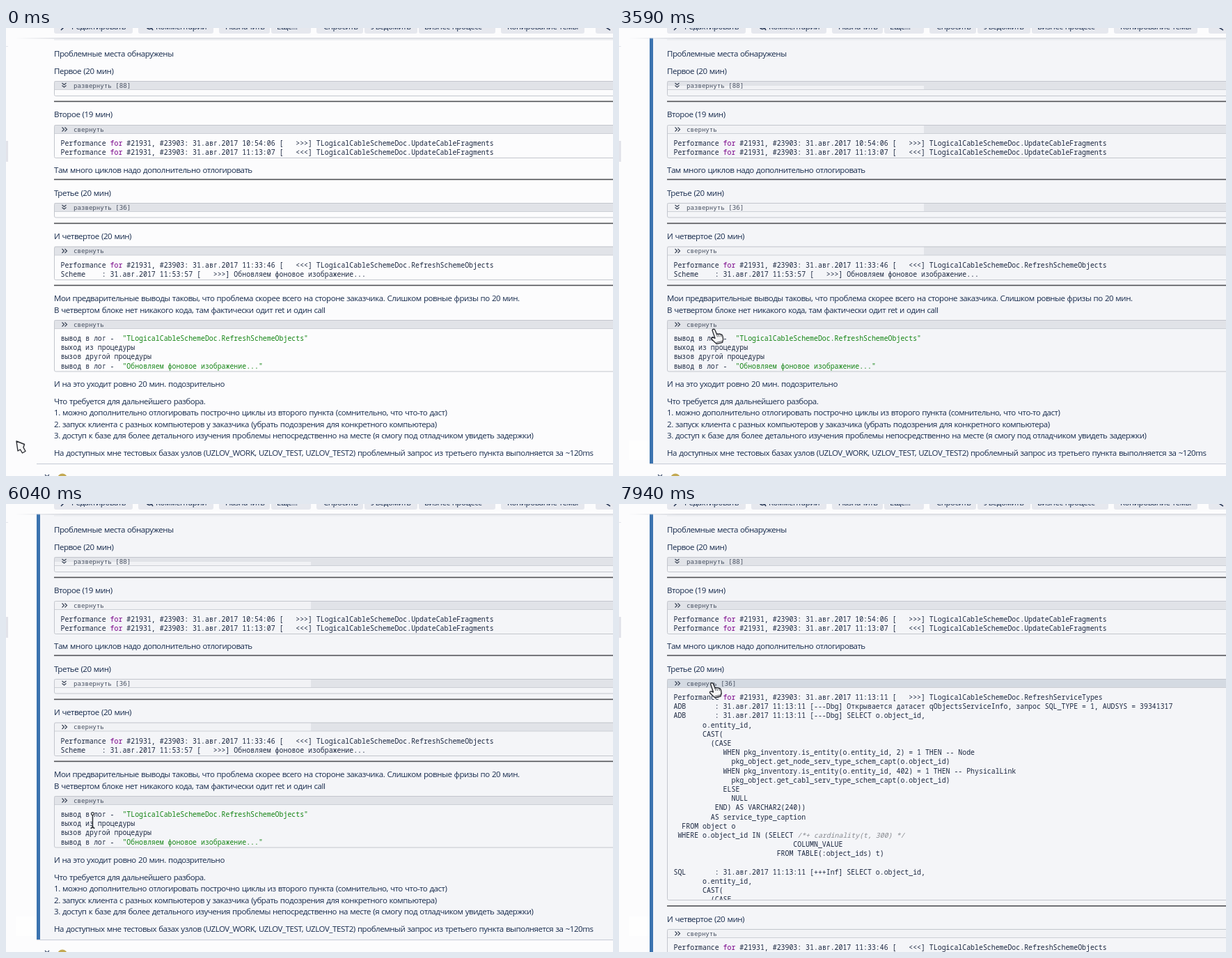
These frames come from a looping animation (872 px wide and 643 px high, 8000 ms). An HTML page:

```html
<!DOCTYPE html>
<html lang="ru">
<head>
<meta charset="utf-8">
<title>Комментарий</title>
<style>
html, body { margin: 0; width: 100%; height: 100%; overflow: hidden; background: #fcfcfd; }
svg { display: block; }
text { white-space: pre; fill: #172b4d; }
.body { font: 11.5px "Open Sans", "Noto Sans", sans-serif; letter-spacing: -.45px; word-spacing: .65px; }
.code { font: 9.89px "Noto Sans Mono", "DejaVu Sans Mono", monospace; fill: #1b2740; }
.label { font: 9.1px "DejaVu Sans Mono", "Liberation Mono", monospace; fill: #4a5364; }
.str { fill: #138413; }
.key { fill: #770088; }
.note { fill: #85888e; font-style: italic; }
</style>
</head>
<body>
<svg id="stage" width="872" height="643" viewBox="0 0 872 643"></svg>
<script>
const LOOP = 8000, PITCH = 13.2, HEAD = 12.5;
const stage = document.getElementById('stage');

function add(parent, tag, attrs = {}, text) {
  const node = document.createElementNS('http://www.w3.org/2000/svg', tag);
  set(node, attrs);
  if (text) node.textContent = text;
  parent.appendChild(node);
  return node;
}
function set(node, attrs) {
  for (const key in attrs) node.setAttribute(key, attrs[key]);
}
const rect = (p, x, y, width, height, fill, more) =>
  add(p, 'rect', { x, y, width, height, fill, ...more });
const para = (p, y, text, x = 69) => add(p, 'text', { x, y, class: 'body' }, text);
const rule = (p, y) => rect(p, 69, y - .4, 803, 1.6, '#505256');
const shift = (node, y) => set(node, { transform: `translate(0 ${y})` });
const show = (node, on) => set(node, { visibility: on ? 'visible' : 'hidden' });

// One line of code; strings, keywords and hints get their colours
function codeLine(p, y, line) {
  const row = add(p, 'text', { x: 78.5, y, class: 'code' });
  for (const part of line.split(/(".*?"|\bfor\b|\/\*.*?\*\/)/)) {
    if (!part) continue;
    const kind = part[0] === '"' ? 'str' : part === 'for' ? 'key' : part.startsWith('/*') ? 'note' : '';
    add(row, 'tspan', kind ? { class: kind } : {}, part);
  }
}

const OPEN_MARK = 'M-3-3l3 3-3 3M1-3l3 3-3 3';
const SHUT_MARK = 'M-3-3.500l3 2.500 3-2.500M-3 0l3 2.500 3-2.500';

// A foldable code block: small = folded height, grow = height added when open
function block(p, y, { small, grow = 0, count = '', code = '', patch = 0 }) {
  const head = rect(p, 69.5, y, 820, HEAD, '#e1e3e8');
  const ghost = rect(p, 70, y + HEAD - patch, 368, patch, '#f1f2f5');
  const frame = rect(p, 69.5, y + .5, 820, 0, 'none', { stroke: '#c3c6cd', rx: 2 });
  add(p, 'path', { d: `M70 ${y + HEAD}H872`, stroke: '#cdd0d6' });
  const mark = add(p, 'path', { transform: `translate(83.500 ${y + 6.5})`, fill: 'none', stroke: '#3c4658', 'stroke-width': 1.2 });
  const label = add(p, 'text', { x: 97, y: y + 9.6, class: 'label' });
  const view = add(p, 'svg', { x: 0, y: y + HEAD, width: 890, overflow: 'hidden' });
  if (code) code.split('\n').forEach((line, i) => codeLine(view, 17.5 + i * PITCH, line));
  return {
    pale(on, width) {
      show(ghost, on);
      set(ghost, { width });
    },
    update(open, shown, fill = '#e1e3e8', ink = '#4a5364') {
      const h = small + grow * open;
      set(head, { fill });
      set(frame, { height: HEAD + h });
      set(view, { height: h });
      set(mark, { d: shown ? OPEN_MARK : SHUT_MARK });
      label.textContent = (shown ? 'свернуть' : 'развернуть') + count;
      label.style.fill = ink;
    }
  };
}

// Page
rect(stage, 0, 0, 872, 643, '#fcfcfd');
const card = add(stage, 'g');
const cardFill = rect(card, 49, 14.5, 823, 611, '#f4f5f8');
const cardBar = rect(card, 44, 14.5, 5, 611, '#3b73af');
rect(card, 14, 592, 30, 28, '#fefefe');

rect(stage, 0, 26, 3, 1, '#e2e3ea');
rect(stage, 0, 162, 3, 30, '#e2e3ea');
const fade = add(add(stage, 'defs'), 'linearGradient', { id: 'fade' });
add(fade, 'stop', { offset: 0, 'stop-color': '#d4d6dc', 'stop-opacity': 0 });
add(fade, 'stop', { offset: .08, 'stop-color': '#d4d6dc' });
rect(stage, 14, 14, 858, 1.5, 'url(#fade)');
rect(stage, 69, 15.5, 803, 2, '#e9ebef');

[[69, 113, 94, 'Редактировать'], [190, 108, 215, 'Комментарии'], [306, 73, 315, 'Назначить'],
 [381, 57, 389, 'Ещё...'], [446, 67, 456, 'Спросить'], [515, 76, 524, 'Уведомить'],
 [593, 110, 601, 'Бизнес-процесс'], [711, 120, 720, 'Копирование темы'], [847, 40, 0, '']
].forEach(([x, w, tx, text]) => {
  rect(stage, x, -12, w, 20, '#e6e8ee', { rx: 3 });
  if (text) para(stage, 1.5, text, tx);
});
add(stage, 'path', { d: 'M79 3l4-4M202-2a4 4 0 0 0 7 2l2 3M860-2l8 5', stroke: '#2a3a58', 'stroke-width': 1.6, fill: 'none' });

// Comment text
const top1 = add(stage, 'g'), mid = add(stage, 'g'), tail = add(stage, 'g');

para(top1, 40.5, 'Проблемные места обнаружены');
para(top1, 65.5, 'Первое (20 мин)');
const first = block(top1, 76, { small: 8.5, count: ' [88]', patch: 5.5 });
rule(top1, 105);
para(top1, 128, 'Второе (19 мин)');
const second = block(top1, 139, { small: 34.5, patch: HEAD, code:
`Performance for #21931, #23903: 31.авг.2017 10:54:06 [   >>>] TLogicalCableSchemeDoc.UpdateCableFragments
Performance for #21931, #23903: 31.авг.2017 11:13:07 [   <<<] TLogicalCableSchemeDoc.UpdateCableFragments` });
para(top1, 208, 'Там много циклов надо дополнительно отлогировать');
rule(top1, 217);
para(top1, 240.5, 'Третье (20 мин)');
const third = block(top1, 251, { small: 8, grow: 296.5, count: ' [36]', patch: HEAD, code:
`Performance for #21931, #23903: 31.авг.2017 11:13:11 [   >>>] TLogicalCableSchemeDoc.RefreshServiceTypes
ADB       : 31.авг.2017 11:13:11 [---Dbg] Открывается датасет qObjectsServiceInfo, запрос SQL_TYPE = 1, AUDSYS = 39341317
ADB       : 31.авг.2017 11:13:11 [---Dbg] SELECT o.object_id,
       o.entity_id,
       CAST(
         (CASE
            WHEN pkg_inventory.is_entity(o.entity_id, 2) = 1 THEN -- Node
              pkg_object.get_node_serv_type_schem_capt(o.object_id)
            WHEN pkg_inventory.is_entity(o.entity_id, 402) = 1 THEN -- PhysicalLink
              pkg_object.get_cabl_serv_type_schem_capt(o.object_id)
            ELSE
              NULL
          END) AS VARCHAR2(240))
         AS service_type_caption
  FROM object o
 WHERE o.object_id IN (SELECT /*+ cardinality(t, 300) */
                             COLUMN_VALUE
                         FROM TABLE(:object_ids) t)

SQL       : 31.авг.2017 11:13:11 [+++Inf] SELECT o.object_id,
       o.entity_id,
       CAST(
         (CASE` });

rule(mid, 280);
para(mid, 303, 'И четвертое (20 мин)');
const fourth = block(mid, 313.5, { small: 35, patch: HEAD, code:
`Performance for #21931, #23903: 31.авг.2017 11:33:46 [   <<<] TLogicalCableSchemeDoc.RefreshSchemeObjects
Scheme    : 31.авг.2017 11:53:57 [   >>>] Обновляем фоновое изображение...` });
rule(mid, 369);
para(mid, 392, 'Мои предварительные выводы таковы, что проблема скорее всего на стороне заказчика. Слишком ровные фризы по 20 мин.');
para(mid, 408.5, 'В четвертом блоке нет никакого кода, там фактически одит ret и один call');
const fifth = block(mid, 419, { small: 8.5, grow: 52.5, code:
`вывод в лог -  "TLogicalCableSchemeDoc.RefreshSchemeObjects"
выход из процедуры
вызов другой процедуры
вывод в лог -  "Обновляем фоновое изображение..."` });

para(tail, 514.5, 'И на это уходит ровно 20 мин. подозрительно');
para(tail, 539.5, 'Что требуется для дальнейшего разбора.');
para(tail, 556, '1. можно дополнительно отлогировать построчно циклы из второго пункта (сомнительно, что что-то даст)');
para(tail, 572.5, '2. запуск клиента с разных компьютеров у заказчика (убрать подозрения для конкретного компьютера)');
para(tail, 589, '3. доступ к базе для более детального изучения проблемы непосредственно на месте (я смогу под отладчиком увидеть задержки)');
para(tail, 613.5, 'На доступных мне тестовых базах узлов (UZLOV_WORK, UZLOV_TEST, UZLOV_TEST2) проблемный запрос из третьего пункта выполняется за ~120ms');
rect(tail, 44, 625, 828, 1.2, '#cbd0d9');
add(tail, 'path', { d: 'M56 641l3 3 3-3', fill: 'none', stroke: '#42526e', 'stroke-width': 1.4 });
add(tail, 'circle', { cx: 81, cy: 646.5, r: 7, fill: '#c3a952' });
const author = para(tail, 652.5, '', 94);
add(author, 'tspan', { style: 'fill:#3a1d6e' }, 'Фадей Мужилов');
add(author, 'tspan', {}, ' добавил(а) комментарий - 31.08.2017 13:45');
rect(tail, 85, 672, 1, 60, '#dfe1e6');
para(tail, 692.5, 'Рефреш, отрисовка компонентов морды.', 102);

// Pointers
const pointer = add(stage, 'g');
const ink = { fill: '#f6f6f6', stroke: '#2b2d33', 'stroke-width': 1.4, 'stroke-linejoin': 'round' };
const shapes = {
  arrow: add(pointer, 'path', { d: 'M1 1L12.500 5.500 11 10 14 15.500 9.500 18 6.500 13 3 15Z', ...ink }),
  beam: add(pointer, 'g'),
  hand: add(pointer, 'g')
};
add(shapes.beam, 'path', { d: 'M0-6V11M-3 12.500Q0 12 0 9Q0 12 3 12.500', fill: 'none', stroke: '#2f3238', 'stroke-width': 1.5 });
add(shapes.beam, 'circle', { cy: -8.5, r: 2, fill: '#fff', stroke: '#2f3238', 'stroke-width': 1.2 });
add(shapes.hand, 'path', { d: 'M-3.500 1.500Q-3-.5-.5 0Q.5 .5 3 7.500Q4 6 5.500 7Q7 6 8.500 7.500Q10.500 7 11.500 10Q13 14.500 11 19L3 21Q-1 18-4.500 14Q-5 11.500-2 12L.5 13Z', ...ink });
add(shapes.hand, 'path', { d: 'M3 7.500l1 3.500M5.500 7.500l1 3.500M8.500 8l1 3M2.500 19L11 17', stroke: '#55585f', fill: 'none' });

// Pointer moves: start, end, number of steps, way points
const moves = [
  [620, 680, 2, [[14, 592], [14, 601]]],
  [1140, 1290, 3, [[14, 601], [154, 590]]],
  [1720, 2350, 8, [[154, 590], [361, 300]]],
  [2630, 3410, 10, [[361, 300], [415, 400], [250, 485], [139, 434]]],
  [3500, 4190, 9, [[139, 434], [127, 421]]],
  [4370, 4430, 2, [[127, 421], [128, 424]]],
  [4610, 4700, 2, [[128, 424], [124, 419.5]]],
  [5350, 6130, 10, [[124, 419.5], [124, 420], [124, 421], [124.5, 456]]],
  [6220, 6940, 9, [[124.5, 456], [132, 257]]],
  [7940, 7940, 1, [[132, 257], [135, 257]]]
];
const clamp = v => Math.min(1, Math.max(0, v));
const ease = v => v * v * (3 - 2 * v);
const slide = (t, a, b) => ease(clamp((t - a) / (b - a)));
const within = (t, a, b) => t >= a && t < b;

function pointerAt(t) {
  const move = moves.filter(m => m[0] <= t).pop();
  if (!move) return moves[0][3][0];
  const [from, to, steps, pts] = move;
  const step = steps > 1 ? Math.floor((t - from) / (to - from) * (steps - 1) + .1) + 1 : 1;
  const pos = ease(clamp(step / steps)) * (pts.length - 1);
  const i = Math.min(Math.floor(pos), pts.length - 2), f = pos - i;
  return [0, 1].map(k => pts[i][k] + (pts[i + 1][k] - pts[i][k]) * f);
}

function render(t) {
  const [x, y] = pointerAt(t);
  const active = t >= 1140;
  const open3 = slide(t, 7370, 7660);
  const open5 = 1 - slide(t, 3860, 4180) + slide(t, 5440, 5790);
  const down = open3 * 296.5, end = down - 52.5 * (1 - open5);

  shift(mid, down);
  shift(tail, end);
  show(card, active);
  set(cardFill, { height: 611 + end });
  set(cardBar, { height: 611 + end });

  const over3 = y >= 251 && y < 264, over5 = y >= 419 && y < 432 && t < 7000;
  const pressed = within(t, 3860, 4370) || within(t, 5440, 6000) || t >= 7370;
  const tint = over => !over ? [] : pressed ? ['#d4dae2'] : ['#dce3f0', '#2259c4'];
  first.update(0, false);
  second.update(0, true);
  third.update(open3, t >= 7370, ...tint(over3));
  fourth.update(0, true);
  fifth.update(open5, !within(t, 3860, 5440), ...tint(over5));

  // Headers stay pale where the page was repainted
  const paleWidth = t < 6940 ? 368 : 802;
  first.pale(within(t, 2720, 7570), paleWidth);
  second.pale(within(t, 2720, 7570), paleWidth);
  third.pale(within(t, 2720, 6850), paleWidth);
  fourth.pale(t >= 2720, paleWidth);

  const kind = x < 45 ? 'arrow' : over3 || (y >= 418 && y < 435 && t < 7000) ? 'hand' : 'beam';
  for (const name in shapes) show(shapes[name], name === kind);
  set(pointer, { transform: `translate(${x} ${y})` });
}

const began = performance.now();
function tick() {
  render((performance.now() - began) % LOOP);
  requestAnimationFrame(tick);
}
tick();
</script>
</body>
</html>
```
